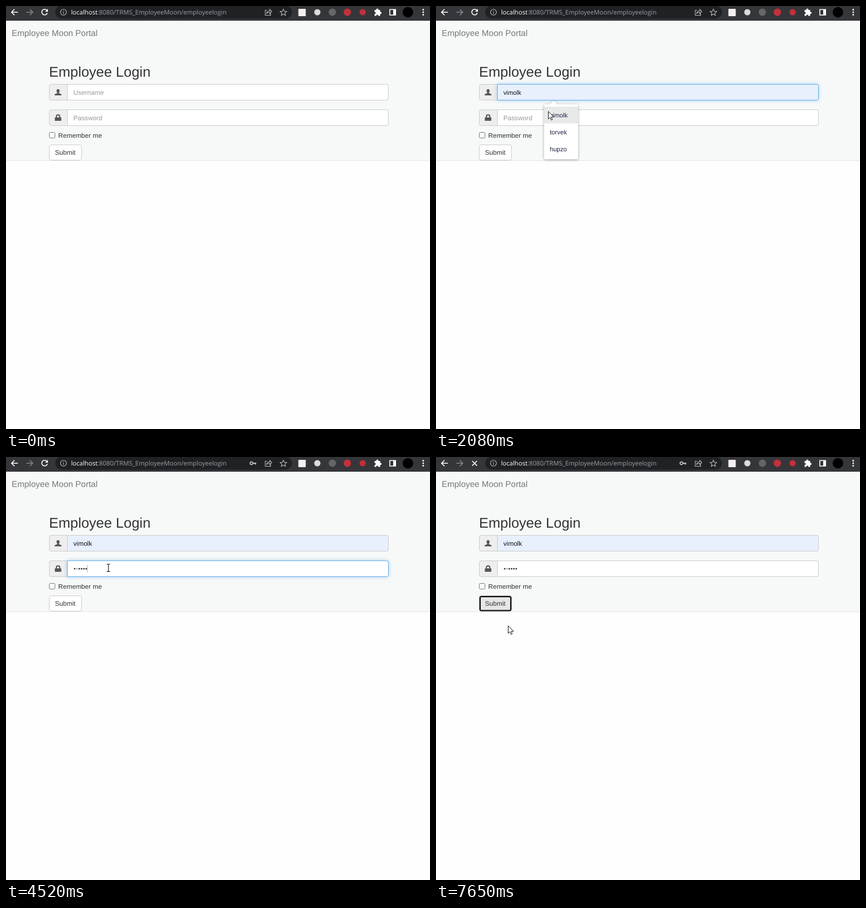
Recreate the animation shown at these times as an HTML page. Size 749x748 px, loop 8 s.

```html
<!DOCTYPE html>
<html lang="en">
<head>
<meta charset="utf-8">
<title>Employee Login</title>
<style>
  html, body { margin: 0; width: 100%; height: 100%; overflow: hidden; background: #fefefe; }
  svg { display: block; }
  text { font: 11.67px "Liberation Sans", Arial, sans-serif; fill: #333; text-rendering: geometricPrecision; }
  .ui { font: 11.13px "Open Sans", "Noto Sans", sans-serif; fill: #9aa0a6; }
  .small { font-size: 11.1px; fill: #1d2440; }
  .hint { fill: #999; }
  .line { fill: none; stroke: #fff; stroke-width: 1.6; }
  .dim { stroke: #b8bbbf; stroke-width: 1.1; }
  .box { fill: #fff; stroke: #ccc; }
  .focus { stroke: #66afe9; filter: drop-shadow(0 0 3px rgba(102, 175, 233, .6)); }
  .popup { filter: drop-shadow(0 1px 2px rgba(0, 0, 0, .35)); }
  .popup path { fill: #fff; }
  .pointer { fill: #fff; stroke: #000; stroke-width: .9; stroke-linejoin: round; }
</style>
</head>
<body>
<svg width="749" height="748" viewBox="0 0 749 748">
  <rect width="749" height="748" fill="#fefefe"/>
  <rect width="749" height="273" fill="#f7f9f9"/>
  <path d="M0 273.5H749" stroke="#e5e7e7"/>

  <!-- browser toolbar -->
  <rect width="749" height="26" fill="#35363a"/>
  <rect x="87" y="-1" width="418" height="23.5" rx="11.7" fill="#202124"/>
  <path class="line" d="M21 11H10M15 5.8L9.8 11 15 16.2"/>
  <path class="line" style="stroke:#85868a" d="M36 11H47M42 5.8L47.2 11 42 16.2"/>
  <g id="reload">
    <path class="line" d="M72.3 7.8A5 5 0 1 0 73 12.3"/>
    <path d="M74 5v5h-5z" fill="#fff"/>
  </g>
  <path id="stop" class="line" d="M64 7l8.4 8.4m0-8.4L64 15.4"/>
  <circle class="line dim" cx="101.5" cy="11" r="5.2"/>
  <path class="line dim" d="M101.5 10.3v3.4M101.5 8v1.3"/>
  <text class="ui" x="115" y="15"><tspan fill="#fff">localhost</tspan>:8080/TRMS_EmployeeMoon/employeelogin</text>
  <g id="key">
    <circle class="line dim" cx="433.6" cy="11" r="2.4" style="stroke-width:1.8"/>
    <path class="line dim" d="M436 11H442M440.5 11v2.6" style="stroke-width:2"/>
  </g>
  <path class="line dim" d="M461 7.5h-3v9h9.500v-3M460.500 13c.5-3 2.500-4.500 5.500-4.500V6l3.500 3.800-3.500 3.700V11c-2.500 0-4 .5-5.500 2z"/>
  <path class="line dim" d="M490 5.500l1.700 3.800 4.100.4-3.100 2.700.9 4.100-3.600-2.200-3.600 2.200.9-4.100-3.100-2.700 4.100-.4z"/>
  <rect x="516.500" y="5" width="13" height="13" rx="1" fill="#f5f0f0"/>
  <circle cx="550" cy="11" r="5.500" fill="#dcdcdc"/>
  <circle cx="576.500" cy="11" r="6.500" fill="#65666a"/>
  <circle cx="603" cy="11" r="6.500" fill="#c5303a"/>
  <circle cx="630" cy="11" r="5.500" fill="#c0303c"/>
  <path fill="#fff" d="M651 7h3.200a1.900 1.900 0 1 1 3.600 0H661v3.400a1.900 1.900 0 1 1 0 3.600V17.500h-3.500a1.700 1.700 0 1 0-3.200 0H651V14a1.700 1.700 0 1 0 0-3.300z"/>
  <path class="line" d="M678 6.200h10.200v9.800H678z"/>
  <path d="M684 6h4.500v10H684z" fill="#fff"/>
  <circle cx="710" cy="11" r="9.300" fill="#000"/>
  <g fill="#fff"><circle cx="737" cy="6.500" r="1.400"/><circle cx="737" cy="11" r="1.400"/><circle cx="737" cy="15.500" r="1.400"/></g>

  <!-- login form -->
  <text x="10" y="53" style="font-size:15px;fill:#777">Employee Moon Portal</text>
  <text x="76" y="125" style="font-size:25px">Employee Login</text>

  <g id="fields"></g>
  <path fill="#555" d="M92 147c2 0 2.900 1.400 2.700 3.200-.1 1.500-.8 2.300-1.200 2.900v.9l3.700 1.700c.8.4 1 .9 1 2.300H85.800c0-1.400.2-1.900 1-2.300l3.700-1.700v-.9c-.4-.6-1.100-1.400-1.200-2.900C89.100 148.400 90 147 92 147z"/>
  <path fill="#555" d="M86.300 197h1.700v-1.500a4 4 0 0 1 8 0v1.500h1.700v6H86.300zM90 197h4v-1.500a2 2 0 0 0-4 0z"/>
  <text id="username" x="119" y="156.700"></text>
  <text id="passHint" class="hint" x="119" y="201.700">Password</text>
  <g id="dots"></g>
  <path id="caret" stroke="#555" stroke-width=".9"/>

  <rect id="check" x="76.500" y="223.500" width="10" height="10" rx="2" fill="#fff" stroke="#767676"/>
  <text x="92.300" y="232.500">Remember me</text>
  <rect id="button" x="76.500" y="245.500" width="57" height="27" rx="3.300"/>
  <rect id="ring" x="78" y="247" width="54" height="24.500" rx="2" fill="none" stroke="#101010" stroke-width="2"/>
  <text x="86.500" y="263">Submit</text>

  <!-- suggestion popups -->
  <g id="userPopup">
    <g class="popup"><path d="M193 174h8l7-6.500 7 6.500h34a2 2 0 0 1 2 2v93a2 2 0 0 1-2 2H193a2 2 0 0 1-2-2v-93a2 2 0 0 1 2-2z"/></g>
    <rect id="item" x="191" y="178" width="60" height="29.500" fill="#e8e9e9"/>
    <text class="small" x="201" y="196.700">vimolk</text>
    <text class="small" x="201" y="226.700">torvek</text>
    <text class="small" x="201" y="256.700">hupzo</text>
  </g>
  <g id="passPopup">
    <g class="popup"><path d="M193 219h8l7-6.500 7 6.500h244a2 2 0 0 1 2 2v33a2 2 0 0 1-2 2H193a2 2 0 0 1-2-2v-33a2 2 0 0 1 2-2z"/></g>
    <circle cx="208" cy="237.500" r="6.700" fill="#4285f4"/>
    <text class="ui" x="224" y="241.500" style="font-size:10.290px;fill:#5f6368">Use passwords saved in your Vuddle Account</text>
  </g>

  <g id="cursor">
    <path id="arrow" class="pointer" d="M.5.5V13.800L3.500 11 5.600 15.700 7.700 14.800 5.700 10.200H10z"/>
    <path id="beam" class="line" style="stroke:#111;stroke-width:1.100" d="M-3-6.500H-.8L0-5.800.8-6.500H3M0-6V6M-3 6.500H-.8L0 5.800.8 6.500H3"/>
    <path id="hand" class="pointer" d="M-1.300 9V1.200a1.300 1.300 0 0 1 2.600 0V6l5 1q1.500.4 1.500 2v3l-1.500 4.500h-6L-4.500 10.500q0-2.300 2-1.300z"/>
  </g>
</svg>
<script>
const LOOP = 8000, STEP = 70;
const $ = id => document.getElementById(id);
const show = (id, on) => $(id).style.display = on ? "" : "none";
const set = (id, attrs) => { for (const k in attrs) $(id).setAttribute(k, attrs[k]); };

// Input groups: icon cell, field, and the focused look laid over it.
$("fields").innerHTML = [["user", 138.500], ["pass", 183.500]].map(([name, y]) => `
  <rect class="box" x="76.500" y="${y}" width="599" height="28" rx="3.300" style="fill:#eee"/>
  <path id="${name}Field" class="box" d="M108.500 ${y}H672.200a3.300 3.300 0 0 1 3.300 3.300v21.400a3.300 3.300 0 0 1-3.300 3.300H108.500z"/>
  <path id="${name}Focus" class="box focus" d="M108.500 ${y}H672.200a3.300 3.300 0 0 1 3.300 3.300v21.400a3.300 3.300 0 0 1-3.300 3.300H108.500z"/>`).join("");
$("dots").innerHTML = Array.from({ length: 6 }, (_, i) =>
  `<circle cx="${121.300 + 4.080 * i}" cy="197.700" r="1.400" fill="#333" opacity="${i === 1 ? .45 : 1}"/>`).join("");

// Pointer path: time, x, y
const PATH = [
  [70, 627, 719], [770, 160, 222], [840, 160, 222], [1050, 183, 159], [1750, 183, 159],
  [1960, 198, 186], [2310, 198, 186], [2520, 182, 197], [3220, 182, 197], [3290, 181, 196],
  [5040, 181, 196], [5180, 237, 171], [5460, 149, 237], [5570, 149, 237], [5700, 108, 263],
  [6020, 108, 263], [6230, 141, 300], [6440, 141, 300], [6510, 150, 300],
  [7490, 150, 300], [7560, 136, 299], [7630, 127, 298]
];
const USER_FOCUS = [[1410, .25], [1480, .7], [1530, 1], [2610, .6], [2690, .1], [2750, 0]];
const PASS_FOCUS = [[2610, .4], [2690, .9], [2750, 1], [6000, .5], [6080, 0]];
const KEY_PRESSES = [3270, 3480, 3990, 4070, 4300, 4520];

const during = (t, from, to = LOOP) => t >= from && t < to;
const held = (t, steps) => steps.reduce((value, [at, next]) => t >= at ? next : value, 0);

function pointerAt(t) {
  const i = PATH.findIndex(p => p[0] > t);
  if (i < 0) return PATH.at(-1).slice(1);
  if (i === 0) return PATH[0].slice(1);
  const [a, b] = [PATH[i - 1], PATH[i]];
  const u = (t - a[0]) / (b[0] - a[0]), ease = u * u * (3 - 2 * u);
  return [1, 2].map(k => a[k] + (b[k] - a[k]) * ease);
}

function render(t) {
  const [x, y] = pointerAt(Math.floor(t / STEP) * STEP);
  const over = (x0, y0, x1, y1) => t >= 70 && x >= x0 && x < x1 && y >= y0 && y < y1;

  const userOpen = during(t, 1530, 2240), passOpen = during(t, 2690, 3270);
  const onItem = userOpen && over(191, 178, 251, 208);
  const onLabel = over(76, 220, 171, 237), onButton = over(76, 245, 134, 273);
  const onField = over(109, 138, 676, 167) || over(109, 183, 676, 212);
  const onPopup = userOpen && over(191, 174, 251, 271);

  show("cursor", t >= 70);
  set("cursor", { transform: `translate(${Math.round(x)} ${Math.round(y)})` });
  const hand = onLabel || onButton, beam = onField && !onPopup;
  show("hand", hand);
  show("beam", beam);
  show("arrow", !hand && !beam);

  const chosen = t >= 2240, filled = chosen || onItem;
  $("username").textContent = filled ? "vimolk" : "Username";
  $("username").style.fontSize = onItem ? "11.1px" : "";
  $("username").style.fill = filled ? "#111" : "#999";
  for (const id of ["userField", "userFocus"]) $(id).style.fill = filled ? "#e8f0fe" : "#fff";
  $("userFocus").style.opacity = held(t, USER_FOCUS);
  $("passFocus").style.opacity = held(t, PASS_FOCUS);

  const typed = KEY_PRESSES.filter(at => t >= at).length;
  show("passHint", !typed);
  [...$("dots").children].forEach((dot, i) => dot.style.display = i < typed ? "" : "none");

  const inUser = during(t, 1410, 1910) && !filled;
  show("caret", inUser || during(t, 2690, 3070) || during(t, 3270, 5100));
  set("caret", { d: `M${119.500 + 4.080 * typed - (typed ? .5 : 0)} ${inUser ? 146 : 191}v13`, opacity: typed ? .5 : 1 });

  show("userPopup", userOpen);
  show("item", onItem);
  show("passPopup", passOpen);
  show("key", t >= 3340);
  show("reload", t < 6080);
  show("stop", t >= 6080);

  set("check", { stroke: onLabel ? "#4f4f4f" : "#767676" });
  const pressed = t >= 6000;
  set("button", { fill: pressed || onButton ? "#e6e6e6" : "#fff", stroke: pressed ? "#8c8c8c" : onButton ? "#adadad" : "#ccc" });
  show("ring", pressed);
}

const start = performance.now();
function tick() {
  render((performance.now() - start) % LOOP);
  requestAnimationFrame(tick);
}
tick();
</script>
</body>
</html>
```
